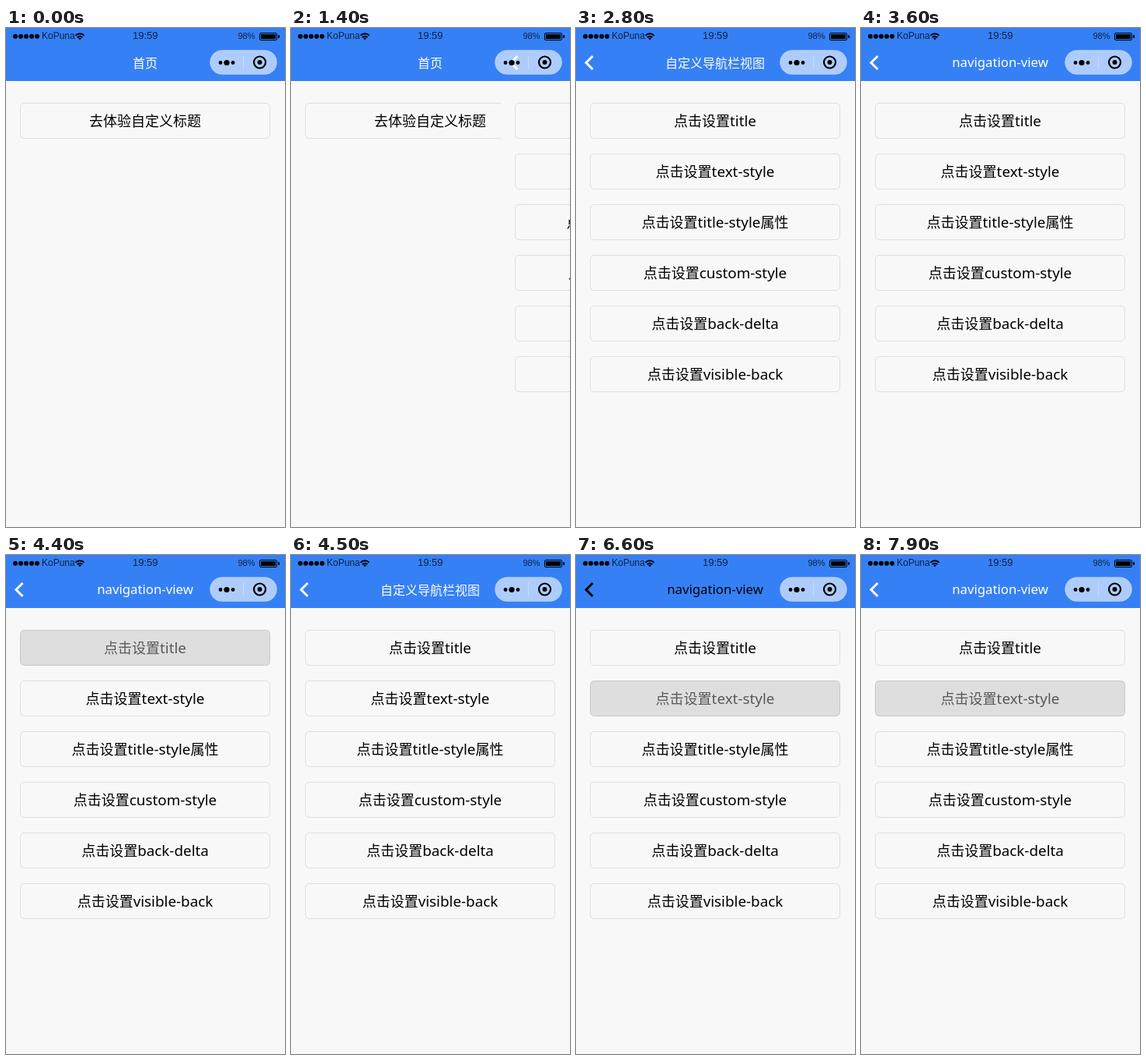
An HTML page that plays this animation: 359x640 px, repeating every 8 s.

```html
<!DOCTYPE html>
<html lang="zh-CN">
<head>
<meta charset="utf-8">
<title>自定义标题</title>
<style>
  html, body { margin: 0; width: 100%; height: 100%; overflow: hidden; background: #f8f8f8; }
  svg { display: block; }

  text { font: 18px "Noto Sans CJK SC", "Noto Sans CJK", sans-serif; text-anchor: middle; }
  .en { font-family: "Noto Sans", "Open Sans", sans-serif; font-size: 1.047em; }
  .title { font-size: 16px; fill: currentColor; }
  .status text { font: 12px "Liberation Sans", sans-serif; text-anchor: start; fill: #000; opacity: .75; }

  .bar { fill: #3680f5; }
  .page { fill: #f8f8f8; }
  .btn rect { fill: #f8f8f8; stroke: #dfdfdf; }
  .btn text { fill: #000; }

  .slide, .head, .zh, .nav, .press rect, .press text { animation: 8s step-end infinite; }
  .slide { animation-name: slide; }
  .head { animation-name: tint; color: #fff; }
  .zh { animation-name: zh; }
  .nav { animation-name: nav; }
  .first rect { animation-name: box-first; }
  .first text { animation-name: ink-first; }
  .second rect { animation-name: box-second; }
  .second text { animation-name: ink-second; }

  @keyframes slide {
    0% { transform: translateX(360px); }
    17.5% { transform: translateX(270px); }
    18.75% { transform: translateX(60px); }
    20%, 100% { transform: none; }
  }
  /* the title flips between two names with every tap */
  @keyframes zh {
    0%, 45%, 65%, 100% { visibility: hidden; }
    35%, 56.25% { visibility: visible; }
  }
  @keyframes nav {
    0%, 45%, 65%, 100% { visibility: visible; }
    35%, 56.25% { visibility: hidden; }
  }
  @keyframes tint {
    0%, 98.75%, 100% { color: #fff; }
    82.5% { color: #000; }
  }
  @keyframes box-first {
    0%, 45%, 56.25%, 65%, 100% { fill: #f8f8f8; stroke: #dfdfdf; }
    43.75%, 55%, 63.75% { fill: #dedede; stroke: #c8c8c8; }
  }
  @keyframes ink-first {
    0%, 45%, 56.25%, 65%, 100% { fill: #000; }
    43.75%, 55%, 63.75% { fill: #595959; }
  }
  @keyframes box-second {
    0%, 83.75% { fill: #f8f8f8; stroke: #dfdfdf; }
    82.5%, 98.75%, 100% { fill: #dedede; stroke: #c8c8c8; }
  }
  @keyframes ink-second {
    0%, 83.75% { fill: #000; }
    82.5%, 98.75%, 100% { fill: #595959; }
  }
</style>
</head>
<body>
<svg width="359" height="640" viewBox="0 0 359 640">
  <defs>
    <rect id="box" x="18.5" y="96.5" width="321" height="45" rx="5"/>
  </defs>

  <g>
    <rect class="page" width="359" height="640"/>
    <rect class="bar" width="359" height="68"/>
    <text class="title" x="179" y="50.5" color="#fff">首页</text>
    <g class="btn">
      <rect x="18.5" y="96.5" width="321" height="45" rx="5"/>
      <text x="179" y="126">去体验自定义标题</text>
    </g>
  </g>

  <g class="slide">
    <rect class="page" width="359" height="640"/>
    <rect class="bar" width="359" height="68"/>
    <g class="head">
      <path d="M21.5 36L13 44.5L21.5 53" fill="none" stroke="currentColor" stroke-width="3"/>
      <text class="title zh" x="179" y="50.5">自定义导航栏视图</text>
      <text class="title nav" x="179" y="50"><tspan class="en">navigation-view</tspan></text>
    </g>
    <g class="btn press first">
      <rect x="18.5" y="96.5" width="321" height="45" rx="5"/>
      <text x="179" y="126">点击设置<tspan class="en">title</tspan></text>
    </g>
    <g class="btn press second" transform="translate(0 65)">
      <rect x="18.5" y="96.5" width="321" height="45" rx="5"/>
      <text x="179" y="126">点击设置<tspan class="en">text-style</tspan></text>
    </g>
    <g class="btn" transform="translate(0 130)">
      <rect x="18.5" y="96.5" width="321" height="45" rx="5"/>
      <text x="179" y="126">点击设置<tspan class="en">title-style</tspan>属性</text>
    </g>
    <g class="btn" transform="translate(0 195)">
      <rect x="18.5" y="96.5" width="321" height="45" rx="5"/>
      <text x="179" y="126">点击设置<tspan class="en">custom-style</tspan></text>
    </g>
    <g class="btn" transform="translate(0 260)">
      <rect x="18.5" y="96.5" width="321" height="45" rx="5"/>
      <text x="179" y="126">点击设置<tspan class="en">back-delta</tspan></text>
    </g>
    <g class="btn" transform="translate(0 325)">
      <rect x="18.5" y="96.5" width="321" height="45" rx="5"/>
      <text x="179" y="126">点击设置<tspan class="en">visible-back</tspan></text>
    </g>
  </g>

  <g class="status">
    <path d="M12 10.8h28.1" stroke="#000" stroke-width="6" stroke-linecap="round" stroke-dasharray="0 7"/>
    <text x="46" y="14">KoPuna</text>
    <g fill="none" stroke="#000" stroke-width="1.9">
      <path d="M89.4 9.6a8 8 0 0 1 11.2 0M91.6 12a5 5 0 0 1 6.8 0"/>
      <path d="M95 15.2l-2-2a2.8 2.8 0 0 1 4 0z" fill="#000" stroke="none"/>
    </g>
    <text x="163" y="14" style="font-size:13px">19:59</text>
    <text x="298.5" y="14" style="font-size:11px">98%</text>
    <rect x="326.5" y="6.5" width="22" height="9" rx="1.5" fill="none" stroke="#000"/>
    <rect x="328" y="8" width="19" height="6"/>
    <rect x="350" y="9" width="2" height="4" rx="1"/>
  </g>

  <g>
    <rect x="262.5" y="28.5" width="86" height="31" rx="15.5" fill="#fff" fill-opacity=".6" stroke="#fff" stroke-opacity=".25"/>
    <path d="M305.5 35v18" stroke="#fff" stroke-opacity=".3"/>
    <circle cx="276" cy="44.5" r="2.4"/>
    <circle cx="284" cy="44.5" r="3.6"/>
    <circle cx="292" cy="44.5" r="2.4"/>
    <circle cx="326.5" cy="44" r="7.5" fill="none" stroke="#000" stroke-width="2.2"/>
    <circle cx="326.5" cy="44" r="3"/>
  </g>
</svg>
</body>
</html>
```
